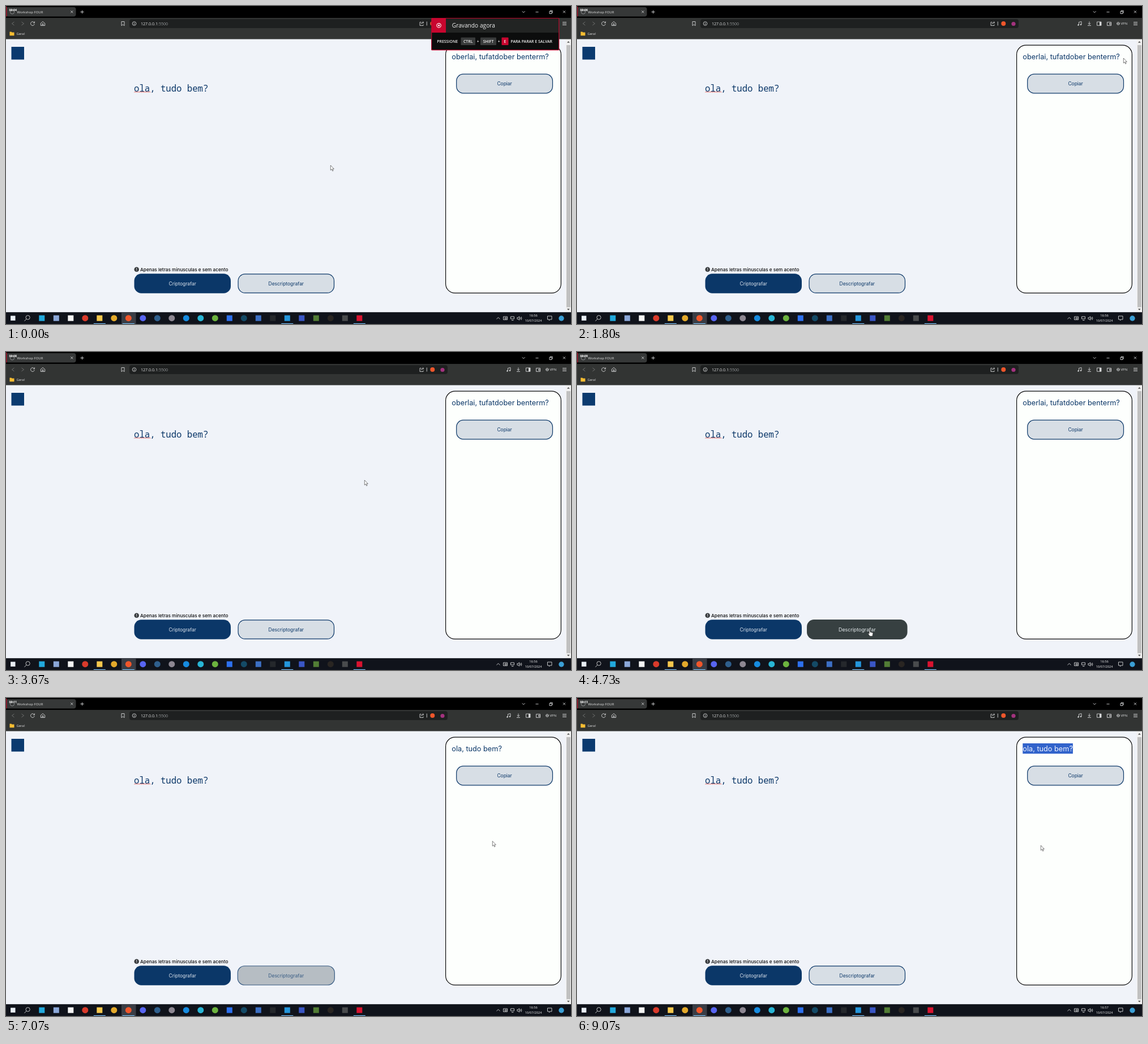
Write an HTML page that moves like this. It is 998 px wide and 561 px high and loops after 9.59 s.

```html
<!DOCTYPE html>
<html lang="pt">
<head>
<meta charset="utf-8">
<title>Criptografador</title>
<style>
  html, body { margin: 0; width: 100%; height: 100%; overflow: hidden; background: #f0f3f9; }
  svg { display: block; width: 100vw; height: 100vh; }
  text { font-family: "Open Sans", "Noto Sans", sans-serif; white-space: pre; }
  .inter { font-family: Inter, sans-serif; }
  .mid { text-anchor: middle; }
  .line { fill: none; stroke: #d4d5d6; stroke-width: .9; }
  .label { font-size: 8.45px; }
  .output { font-size: 12.72px; }
</style>
</head>
<body>
<svg viewBox="0 0 998 561" preserveAspectRatio="none">
  <!-- page -->
  <rect y="58" width="998" height="483" fill="#f0f3f9"/>
  <rect x="9.500" y="72" width="22.500" height="22.500" fill="#0b3a6f"/>
  <text x="226" y="150.500" font-size="15.650" fill="#0b3768" style="font-family:'Noto Sans Mono',monospace">ola, tudo bem?</text>
  <path id="squiggle" fill="none" stroke="#e0392f" stroke-width=".8"/>
  <circle cx="230.700" cy="464.800" r="4.300" fill="#3a3d40"/>
  <path d="M230.700 462.300v3M230.700 466.300v1" stroke="#f0f3f9"/>
  <text class="inter" x="237" y="468" font-size="8.230" font-weight="500" fill="#0a0a0a">Apenas letras minusculas e sem acento</text>
  <rect x="226.500" y="472.300" width="170.500" height="34.400" rx="12.500" fill="#0b3768"/>
  <text class="inter mid label" x="311.800" y="492.500" fill="#dce3ec">Criptografar</text>
  <rect x="776.600" y="69.200" width="203.800" height="437.200" rx="16.500" fill="#fdfffd" stroke="#0a0a0a" stroke-width="1.200"/>
  <rect x="795.700" y="120.200" width="169.800" height="33.600" rx="12" fill="#d7dee5" stroke="#0b3768" stroke-width="1.200"/>
  <text class="inter mid label" x="880.600" y="139.800" fill="#0b3768">Copiar</text>
  <text id="result" class="inter output" x="787.300" y="93.700" fill="#0b3768"></text>
  <clipPath id="selectionClip"><rect id="selectionArea" x="787.300" y="80" height="18.500"/></clipPath>
  <g clip-path="url(#selectionClip)">
    <rect x="787" y="80" width="180" height="18.500" fill="#3163cb"/>
    <text class="inter output" x="787.300" y="93.700" fill="#eef3ff">ola, tudo bem?</text>
  </g>
  <g id="button">
    <rect id="buttonBox" x="-84.700" y="-16.600" width="169.400" height="33.200" rx="12" stroke-width="1.200"/>
    <text id="buttonText" class="inter mid label" y="3">Descriptografar</text>
  </g>
  <rect x="988.500" y="58" width="9.500" height="483" fill="#f1f1f1"/>
  <rect x="990" y="69" width="7" height="462.500" fill="#c0c0c0"/>
  <path d="M991 64.700l2.400-2.700 2.400 2.700zM991 534l2.400 2.700 2.400-2.700z" fill="#555"/>

  <!-- browser -->
  <rect width="998" height="21" fill="#000"/>
  <rect y="21" width="998" height="37.500" fill="#323433"/>
  <rect y="2" width="123.500" height="16.500" rx="4" fill="#363838"/>
  <rect y="1" width="1.700" height="17.500" fill="#8e1527"/>
  <circle cx="11" cy="10.500" r="3.600" fill="none" stroke="#8b8d8f"/>
  <text x="19.500" y="12.500" font-size="6" fill="#e4e4e4">Workshop FOUR</text>
  <text id="timer" x="5.500" y="9.200" font-size="5.300" font-weight="700" fill="#fff"></text>
  <path class="line" d="M114.300 8.300l4 4m0-4l-4 4M134.500 7.500v6m-3-3h6M911.700 9.300l2.500 2.300 2.500-2.300M935.500 10.700h5M960 9.500h4v4h-4zM961.200 9.300v-1.200h4v4h-1M984 8.300l4 4m0-4l-4 4"/>
  <path class="line" opacity=".4" d="M14.500 28l-4 3 4 3M27.500 28l4 3-4 3"/>
  <path class="line" d="M49.800 29.200a3.400 3.400 0 1 0 .5 2.500M50.500 27.300v2.500h-2.500M61.300 30.500l3.700-3 3.700 3v4h-7.400zM64 34v-2.500h2V34M204 27.500h5v7.200l-2.500-2-2.500 2z"/>
  <rect x="218" y="23.300" width="562" height="15.800" rx="4" fill="#1e2020"/>
  <path class="line" d="M223.200 31a3.300 3.300 0 1 0 6.600 0a3.300 3.300 0 1 0-6.600 0M226.500 30.500v2.500M226.500 29v.7M733.500 28.500h-2.500v6h6v-2M733 32q.5-3 4.500-3m-1.700-1.700l2 1.700-2 1.700M743.300 27.500v7"/>
  <text x="238" y="33.600" font-size="7.100" fill="#e3e4e5">127.0.0.1<tspan fill="#979a9c">:5500</tspan></text>
  <circle cx="753.300" cy="31" r="4" fill="#f0562b"/>
  <circle cx="771" cy="31.500" r="3.600" fill="#a3327e"/>
  <path class="line" d="M886.500 33.500v-5l4.500-1v5M905 27.500v5m-2.200-2l2.200 2 2.200-2M902 34.500h6M918.500 28h7.500v6.300h-7.500zM936.500 28.500h7v6h-7zM940.500 30.500h3v2h-3zM953.700 31a2.300 2.300 0 1 0 4.600 0a2.300 2.300 0 1 0-4.600 0M953.700 31h4.600M983 28.600h7m-7 2.400h7m-7 2.400h7"/>
  <circle cx="885.500" cy="33.500" r="1.200" fill="#d4d5d6"/><circle cx="890" cy="32.700" r="1.200" fill="#d4d5d6"/>
  <path d="M923 28h3v6.300h-3z" fill="#d4d5d6"/>
  <text x="960.500" y="33.200" font-size="6" fill="#dfe0e1">VPN</text>
  <path d="M6.500 45.500h3l1 1h4v5.700h-8z" fill="#f5bd32"/>
  <text x="18.500" y="50.800" font-size="5.800" fill="#e4e4e4">Geral</text>

  <!-- taskbar -->
  <rect y="540.200" width="998" height="20.800" fill="#10131b"/>
  <rect x="204" y="540.200" width="25.500" height="20.800" fill="#3a3d45"/>
  <g id="apps"></g>
  <path class="line" stroke-width="1.300" d="M35 549.500a3.600 3.600 0 1 0 7.200 0a3.600 3.600 0 1 0-7.200 0M36 552.200l-3.500 3.700"/>
  <path class="line" d="M866.500 552.200l3-2.800 3 2.800M878.500 548h7v5.500h-7zM881 550h3v2h-3zM891.500 548h6v4h-6zM893 554.500h3.500M903 549.500h1.700l2-1.800v6.500l-2-1.800h-1.700zM908.300 549.300q1 1.700 0 3.400M910 548.200q1.700 2.800 0 5.600M956.500 547h7.500v6h-3l-1.500 1.700v-1.700h-3z"/>
  <text id="clock" class="mid" x="931.500" y="548" font-size="5.700" fill="#f0f0f0"></text>
  <text class="mid" x="931.500" y="557" font-size="5.700" fill="#f0f0f0">10/07/2024</text>
  <circle cx="981" cy="551" r="4.700" fill="#3b9fd6"/>

  <!-- recorder notice -->
  <g id="notice">
    <rect x="751.700" y="21.700" width="225" height="56" rx="1" fill="#0c0d0d" stroke="#b5092d" stroke-width="1.200"/>
    <rect x="777" y="22.300" width="199" height="24.700" fill="#222423"/>
    <rect x="752" y="22" width="25" height="25" fill="#c8062f"/>
    <circle cx="764.600" cy="34.300" r="3.700" fill="none" stroke="#fff" stroke-width="1.100"/>
    <circle cx="764.600" cy="34.300" r="1.500" fill="#fff"/>
    <text x="787.800" y="38.300" font-size="10.200" font-weight="500" fill="#f0f0f0">Gravando agora</text>
    <rect x="803.500" y="55.500" width="25.500" height="13.500" rx="1" fill="#393b3b"/>
    <rect x="838" y="55.500" width="28" height="13.500" rx="1" fill="#393b3b"/>
    <rect x="875.500" y="55.500" width="12" height="13.500" rx="1" fill="#c8062f"/>
    <g font-size="6.900" font-weight="600" fill="#f2f2f2">
      <text x="761.300" y="64.900">PRESSIONE</text>
      <text class="mid" x="816.200" y="64.900">CTRL</text>
      <text class="mid" x="833.600" y="64.900">+</text>
      <text class="mid" x="852" y="64.900">SHIFT</text>
      <text class="mid" x="870.700" y="64.900">+</text>
      <text class="mid" x="881.500" y="64.900">E</text>
      <text x="891.500" y="64.900">PARA PARAR E SALVAR</text>
    </g>
  </g>

  <!-- pointers, each with its hot spot at 0,0 -->
  <path id="arrow" d="M.300 0v8.700l2-1.800 1.400 3.200 1.400-.6-1.400-3.100h2.700z" fill="#fff" stroke="#2a2a2a" stroke-width=".6"/>
  <path id="hand" d="M-.900 6.500V.600q.9-1.200 1.800 0v3l4 .8q1 .4.900 1.500l-.9 4.900h-4.700l-3.200-4.500q.4-1.200 2.100.200z" fill="#fff" stroke="#222" stroke-width=".6"/>
  <path id="beam" d="M-1.800-4.500h1.300l.5.500.5-.5h1.300M0-4v8M-1.800 4.500h1.300l.5-.5.5.5h1.300" fill="none" stroke="#222" stroke-width=".8"/>
</svg>
<script>
const LOOP = 9590, HOVER = 4505, PRESS = 5590, RELEASE = 6000, LEAVE = 6920, SELECT = 8530;
const TEXT_LEFT = 787.3, TEXT_TOP = 80, TEXT_BOTTOM = 98.5;
const $ = id => document.getElementById(id);
const set = (id, attrs) => { for (const k in attrs) $(id).setAttribute(k, attrs[k]); };
const show = (id, on) => { $(id).style.display = on ? '' : 'none'; };
const clamp = x => Math.min(1, Math.max(0, x));
const ramp = (t, start, duration = 300) => 1 - (1 - clamp((t - start) / duration)) ** 2.3;
const mix = (a, b, p) => `rgb(${a.map((v, i) => Math.round(v + (b[i] - v) * p))})`;

// Pointer stops: time, x, y
const path = [
  [0, 573, 281], [1000, 573, 281], [1800, 965, 92], [2000, 965, 92], [2730, 792, 92],
  [2870, 792, 92], [3200, 633, 226], [3670, 633, 226], [4620, 517, 490.5], [6780, 517, 490.5],
  [7070, 859, 252.5], [7530, 848, 165], [7670, 848, 165], [8270, 788, 89], [SELECT, 788, 89],
  [9070, 819, 260], [LOOP, 819, 260]
];

function pointerAt(t) {
  const i = path.findIndex(stop => stop[0] > t);
  const [t0, x0, y0] = path[i - 1], [t1, x1, y1] = path[i];
  const p = (1 - Math.cos(Math.PI * (t - t0) / (t1 - t0))) / 2;
  return [x0 + (x1 - x0) * p, y0 + (y1 - y0) * p];
}

// Taskbar apps: colour and shape (s square, c circle) at an even pitch; blank is the search icon
const apps = ['#e8eef5 s', '', '#22a9dd s', '#8ba7d9 s', '#f4f4f4 s', '#d93a2b c', '#f4c74d s', '#e3a92b c',
  '#f0562b c', '#5865f2 c', '#2f5f8d c', '#8d8792 c', '#168be0 c', '#28b5d5 c', '#6cb33f c', '#2d70ee s',
  '#144a66 c', '#3c6fc4 s', '#25282c s', '#2496dc s', '#3a56c5 s', '#527d35 s', '#292522 c', '#494b4d s', '#d91330 s'];
const running = [6, 8, 19, 24];
$('apps').innerHTML = apps.map((app, i) => {
  if (!app) return '';
  const [color, shape] = app.split(' '), x = 12.3 + i * 25.5, r = shape === 'c' ? 5.5 : i ? 5 : 4.2;
  return `<rect x="${x - r}" y="${550.7 - r}" width="${2 * r}" height="${2 * r}" rx="${shape === 'c' ? r : 0}" fill="${color}"/>`
    + (running.includes(i) ? `<rect x="${x - 10.5}" y="559.8" width="21" height="1.2" fill="#76b9ed"/>` : '');
}).join('');

let wave = 'M226.500 152.500';
for (let i = 0; i < 18; i++) wave += `l1.600 ${i % 2 ? 1.6 : -1.6}`;
set('squiggle', { d: wave });

function draw(t) {
  const seconds = Math.floor((t + 4345) / 1000);
  $('timer').textContent = '00:' + String(seconds).padStart(2, '0');
  $('clock').textContent = t < 8600 ? '16:56' : '16:57';
  show('notice', t < 600);
  $('result').textContent = t < RELEASE ? 'oberlai, tufatdober benterm?' : 'ola, tudo bem?';

  const hover = ramp(t, HOVER) - ramp(t, LEAVE);
  const press = ramp(t, PRESS, 180) - ramp(t, RELEASE, 330);
  const ink = mix([11, 55, 104], [236, 240, 242], hover);
  const bordered = t < HOVER || t >= LEAVE;
  set('button', { transform: `translate(494.800 489.500) scale(${(1 + .05 * hover) * (1 - .08 * press)})` });
  set('buttonBox', { fill: mix([215, 222, 229], [48, 57, 58], hover), stroke: bordered ? ink : 'none' });
  set('buttonText', { fill: ink });

  const [x, y] = pointerAt(t);
  const textWidth = $('result').getComputedTextLength();
  const dragged = y > TEXT_BOTTOM ? textWidth : Math.min(textWidth, Math.max(0, x - TEXT_LEFT));
  set('selectionArea', { width: t > SELECT ? dragged : 0 });

  const overText = y > TEXT_TOP && y < TEXT_BOTTOM && x > TEXT_LEFT && x < TEXT_LEFT + textWidth;
  const kind = t >= HOVER && t < LEAVE ? 'hand' : overText ? 'beam' : 'arrow';
  for (const id of ['arrow', 'hand', 'beam']) show(id, id === kind);
  set(kind, { transform: `translate(${x} ${y})` });
}

function tick() {
  draw(performance.now() % LOOP);
  requestAnimationFrame(tick);
}
tick();
</script>
</body>
</html>
```
